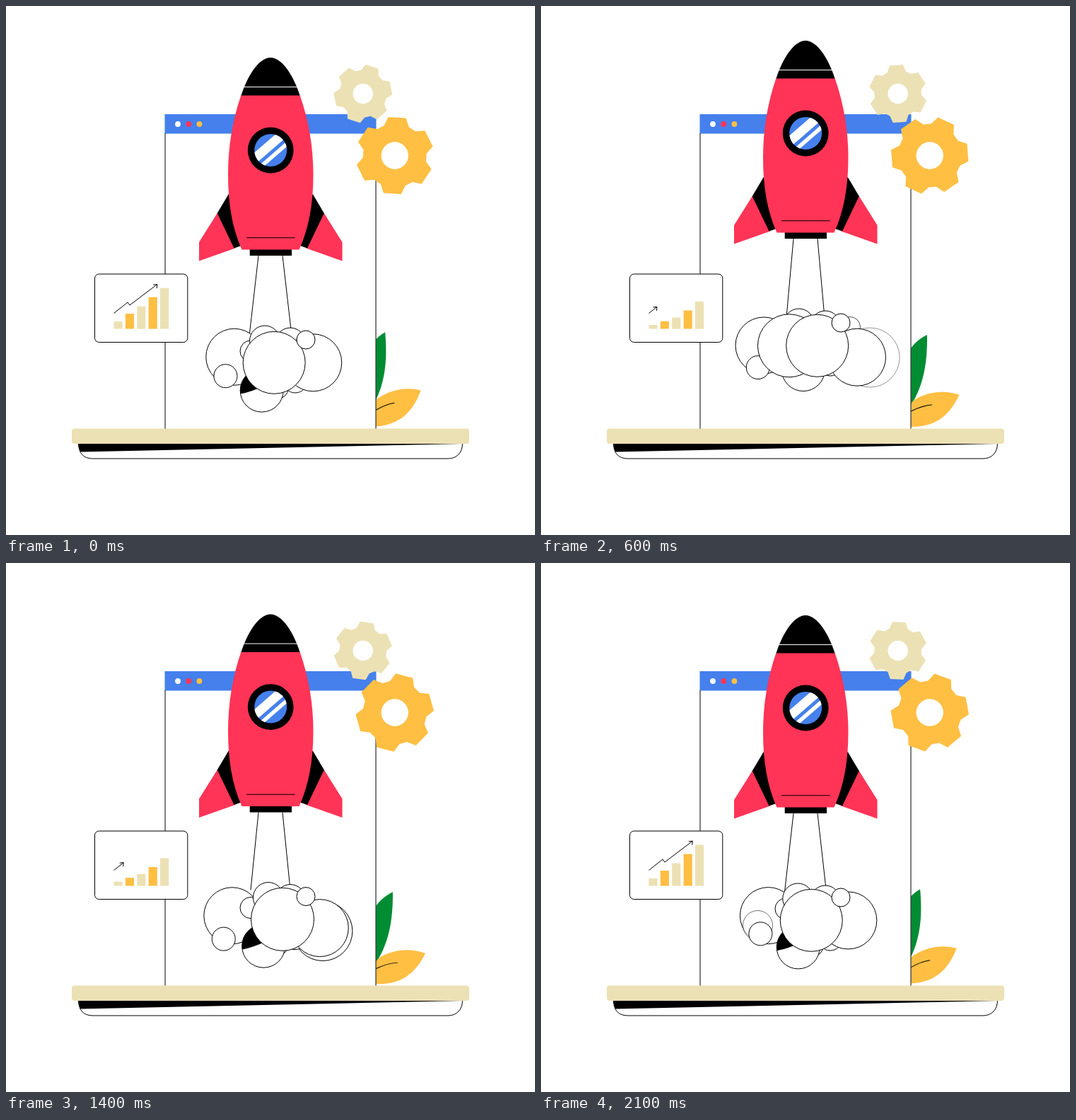
An HTML page with a canvas that plays this animation: 748x748 px, repeating every 2200 ms.

```html
<!DOCTYPE html>
<html lang="en">
<head>
<meta charset="utf-8">
<title>Rocket launch</title>
<style>
html, body { margin: 0; width: 100%; height: 100%; overflow: hidden; background: #fff; }
canvas { display: block; width: 748px; height: 748px; }
</style>
</head>
<body>
<canvas id="stage" width="748" height="748"></canvas>
<script>
const ctx = document.getElementById('stage').getContext('2d');
const LOOP = 2200, STEP = 100, SMOKE = LOOP / 2, RAD = Math.PI / 180;
const RED = '#ff3456', BLUE = '#4580ec', GOLD = '#ffbf43', CREAM = '#ece1b4',
      GREEN = '#008c33', INK = '#000', WHITE = '#fff';

const lerp = (a, b, u) => a + (b - a) * u;
const ease = (t, from, to) => {
  const u = Math.min(1, Math.max(0, (t - from) / (to - from)));
  return (1 - Math.cos(Math.PI * u)) / 2;
};
// One arch per loop: 0 at the seam, 1 halfway.
const arch = t => Math.abs(Math.sin(Math.PI * t / LOOP));
const wave = (t, deg) => Math.cos(2 * Math.PI * t / SMOKE - deg * RAD);

// Smooth looping curve through a few [time, value] keys.
function track(keys) {
  const n = keys.length;
  const gap = (i, j) => (keys[j][0] - keys[i][0] + LOOP) % LOOP;
  const slope = i => {
    const a = (i + n - 1) % n, b = (i + 1) % n;
    return (keys[b][1] - keys[a][1]) / gap(a, b);
  };
  return t => {
    let i = n - 1;
    while (keys[i][0] > t) i--;
    const j = (i + 1) % n, len = gap(i, j), u = (t - keys[i][0]) / len;
    return lerp(keys[i][1], keys[j][1], u * u * (3 - 2 * u))
      + len * u * (1 - u) * ((1 - u) * slope(i) - u * slope(j));
  };
}

const lift = track([[0, 0], [400, -13], [600, -24], [700, -25], [1000, -17], [1200, -8], [1600, 4.5], [2100, 1]]);
const growth = t => 1 - ease(t, -50, 750) + ease(t, 1230, 1970);

function fill(color, path) {
  ctx.fillStyle = color;
  ctx.fill(path);
}
function line(path, color = INK) {
  ctx.strokeStyle = color;
  ctx.stroke(path);
}
function box(color, x, y, w, h) {
  ctx.fillStyle = color;
  ctx.fillRect(x, y, w, h);
}
function disc(x, y, r) {
  const p = new Path2D();
  p.arc(x, y, r, 0, 7);
  return p;
}
function rounded(x, y, w, h, r) {
  const p = new Path2D();
  p.roundRect(x, y, w, h, r);
  return p;
}
function scoped(draw) {
  ctx.save();
  draw();
  ctx.restore();
}
function turn(x, y, deg) {
  ctx.translate(x, y);
  ctx.rotate(deg * RAD);
  ctx.translate(-x, -y);
}

function drawWindow() {
  box(BLUE, 224.5, 153, 299, 27.5);
  line(new Path2D('M225 180V598'));
  [WHITE, RED, GOLD].forEach((c, i) => fill(c, disc(243 + 15.2 * i, 167, 3.9)));
}

const greenLeaf = new Path2D('M548.5 466C540 470 530 477 523.5 487C515 500 510 540 512 580C543 547 548.5 504 548.5 466Z');
const goldLeaf = new Path2D('M586 543C561 537 539 545 523.5 556L508 576L510 594L523.5 594.5C555 592 575 575 586 543Z');
const vein = new Path2D('M514 577C524 570 536 563 549 561');

function drawLeaves(t) {
  scoped(() => {
    ctx.beginPath();
    ctx.rect(523.3, 440, 100, 158);
    ctx.clip();
    scoped(() => { turn(490, 603, 5.5 * (arch(t + 50) - 1)); fill(GREEN, greenLeaf); });
    scoped(() => { turn(519, 602, 7.8 * arch(t - 40)); fill(GOLD, goldLeaf); line(vein); });
  });
  line(new Path2D('M523 180V598'));
}

function drawBase() {
  const tray = new Path2D('M102.5 618C102.5 632 109 640 123 640H625C637 640 645.5 632 645.5 618Z');
  fill(WHITE, tray);
  line(tray);
  fill(INK, new Path2D('M102.5 618H645V619L105.5 630.5Q103 626 102.5 618Z'));
  fill(CREAM, rounded(93, 597.5, 562, 21.5, 4));
}

function drawGear(x, y, outer, inner, hole, color, deg) {
  const p = new Path2D();
  const at = (r, a) => p.lineTo(x + r * Math.sin(a * RAD), y - r * Math.cos(a * RAD));
  for (let i = 0; i < 6; i++) {
    const a = deg + i * 60;
    at(inner, a - 23);
    at(outer, a - 13);
    at(outer, a + 13);
    at(inner, a + 23);
  }
  p.closePath();
  fill(color, p);
  fill(WHITE, disc(x, y, hole));
}

function drawChart(t) {
  const card = rounded(125.5, 379, 131.3, 96.5, 6);
  fill(WHITE, card);
  line(card);
  const g = growth(t);
  const low = [4, 9, 14.5, 25, 38], high = [10.5, 21.5, 32, 45, 58];
  low.forEach((h, i) => {
    const tall = lerp(h, high[i], g ** (.6 + .2 * i));
    box(i % 2 ? GOLD : CREAM, 152.4 + i * 16.4, 456.5 - tall, 12.2, tall);
  });
  drawArrow(79.2 * lerp(.11, 1, g));
}

function drawArrow(left) {
  const pts = [[152.5, 434.5], [172, 419], [175, 423], [214.5, 393]];
  const p = new Path2D();
  let [x, y] = pts[0];
  p.moveTo(x, y);
  for (const [nx, ny] of pts.slice(1)) {
    const len = Math.hypot(nx - x, ny - y);
    const u = Math.min(1, left / len);
    x = lerp(x, nx, u);
    y = lerp(y, ny, u);
    p.lineTo(x, y);
    left -= len;
    if (left <= 0) break;
  }
  p.moveTo(x - 5.5, y + .5);
  p.lineTo(x, y);
  p.lineTo(x - .5, y + 5.5);
  line(p);
}

const nose = new Path2D('M332.5 126.5C341 100 357 73 374 73C391 73 407 100 415.5 126.5Z');
const hull = new Path2D('M332.5 126C320 162 314 200 314 238C314 280 320 315 333.5 344.5H414.5C428 315 434.5 280 434.5 238C434.5 200 428 162 415.5 126Z');
const fin = new Path2D('M299 292.5L273 334V360.5L324 342.5Z');
const strut = new Path2D('M315 265.5L298.7 293L322.5 342.5L334 338.5Z');

function drawFin() {
  fill(RED, fin);
  fill(INK, strut);
}

function drawRocket() {
  drawFin();
  scoped(() => { ctx.translate(748.5, 0); ctx.scale(-1, 1); drawFin(); });
  box(INK, 344.7, 343, 59.3, 10);
  fill(RED, hull);
  fill(INK, nose);
  line(new Path2D('M336 114.5H412'), WHITE);
  line(new Path2D('M340 327.7H408.5'));
  fill(INK, disc(374.2, 204, 32.4));
  scoped(() => {
    ctx.clip(disc(374.2, 204, 23));
    box(BLUE, 350, 180, 50, 50);
    ctx.translate(374.2, 204);
    ctx.rotate(-41 * RAD);
    box(WHITE, -30, -12.5, 60, 13);
    box(WHITE, -30, 5.5, 60, 5.5);
  });
}

function drawJets(t) {
  const s = 11.2 + 1.4 * wave(t, 0);
  const p = new Path2D();
  p.moveTo(357, 353);
  p.lineTo(357 - s, 463);
  p.moveTo(391, 353);
  p.lineTo(391 + s, 463);
  line(p);
}

function drawPuff(x, y, r, alpha = 1, shade = false) {
  const ring = disc(x, y, r);
  ctx.globalAlpha = alpha;
  fill(WHITE, ring);
  if (shade) scoped(() => {
    ctx.clip(ring);
    ctx.translate(x, y);
    ctx.scale(r, r);
    fill(INK, new Path2D('M-1.1 .18Q-.5 .08 .1 -.22L0 -1.1H-1.1Z'));
  });
  line(ring);
  ctx.globalAlpha = 1;
}

// Smoke is listed back to front: puffs that sway in place, and puffs that drift off.
const sway = (x, y, r, dx = 0, dy = 0, deg = 0, shade = false) => t => {
  const w = wave(t, deg);
  drawPuff(x + dx * w, y + dy * w, r, 1, shade);
};
const drift = ({ born, life, x, y, r, dx = 0, dy = 0, dr = 0, rush = 1, fade = 4 }) => t => {
  const u = ((t - born + LOOP) % SMOKE) / life;
  if (u >= 1) return;
  const m = u ** rush;
  drawPuff(x + dx * m, y + dy * m, r + dr * m, 1 - u ** fade);
};

const smoke = [
  drift({ born: 310, life: 110, x: 362, y: 481, r: 39 }),
  drift({ born: 250, life: 400, x: 445, y: 521, r: 42, dx: 23 }),
  drift({ born: 450, life: 200, x: 422, y: 490, r: 22, dx: 20, dy: -16, dr: -10 }),
  sway(319, 500, 40, -4, 4, 200),
  sway(346, 488, 15),
  sway(366, 473.5, 21.5, 5, 0, 90),
  sway(402, 476, 21),
  sway(385, 541, 14),
  sway(409, 530, 17),
  sway(441, 513, 40.5, 7, 9, 165),
  drift({ born: 910, life: 110, x: 306.5, y: 511.5, r: 21 }),
  sway(308.5, 529.5, 16.5, -2, 6.5, 165),
  sway(366, 541, 30.5, -5, 3, 30, true),
  drift({ born: 350, life: 250, x: 322, y: 537, r: 17.5, dx: 11, dy: -5 }),
  drift({ born: 150, life: 500, x: 391, y: 504.3, r: 44.5, dx: -93, rush: 8, fade: 60 }),
  drift({ born: 550, life: 700, x: 391, y: 504.3, r: 44, dx: -17, rush: 1.5, fade: 60 }),
  sway(424, 472, 13)
];

function draw(t) {
  box(WHITE, 0, 0, 748, 748);
  drawWindow();
  drawLeaves(t);
  drawBase();
  const spin = 360 * t / LOOP;
  drawGear(504.7, 124, 41.5, 33.5, 14.2, CREAM, 18.5 + spin);
  drawGear(549.7, 211.5, 55.3, 45, 19.2, GOLD, 3.5 - spin);
  drawChart(t);
  scoped(() => {
    ctx.translate(0, lift(t));
    drawJets(t);
    smoke.forEach(show => show(t));
    drawRocket();
  });
}

const start = performance.now();
function tick() {
  const t = Math.max(0, performance.now() - start) % LOOP;
  draw(Math.floor(t / STEP) * STEP);
  requestAnimationFrame(tick);
}
tick();
</script>
</body>
</html>
```
